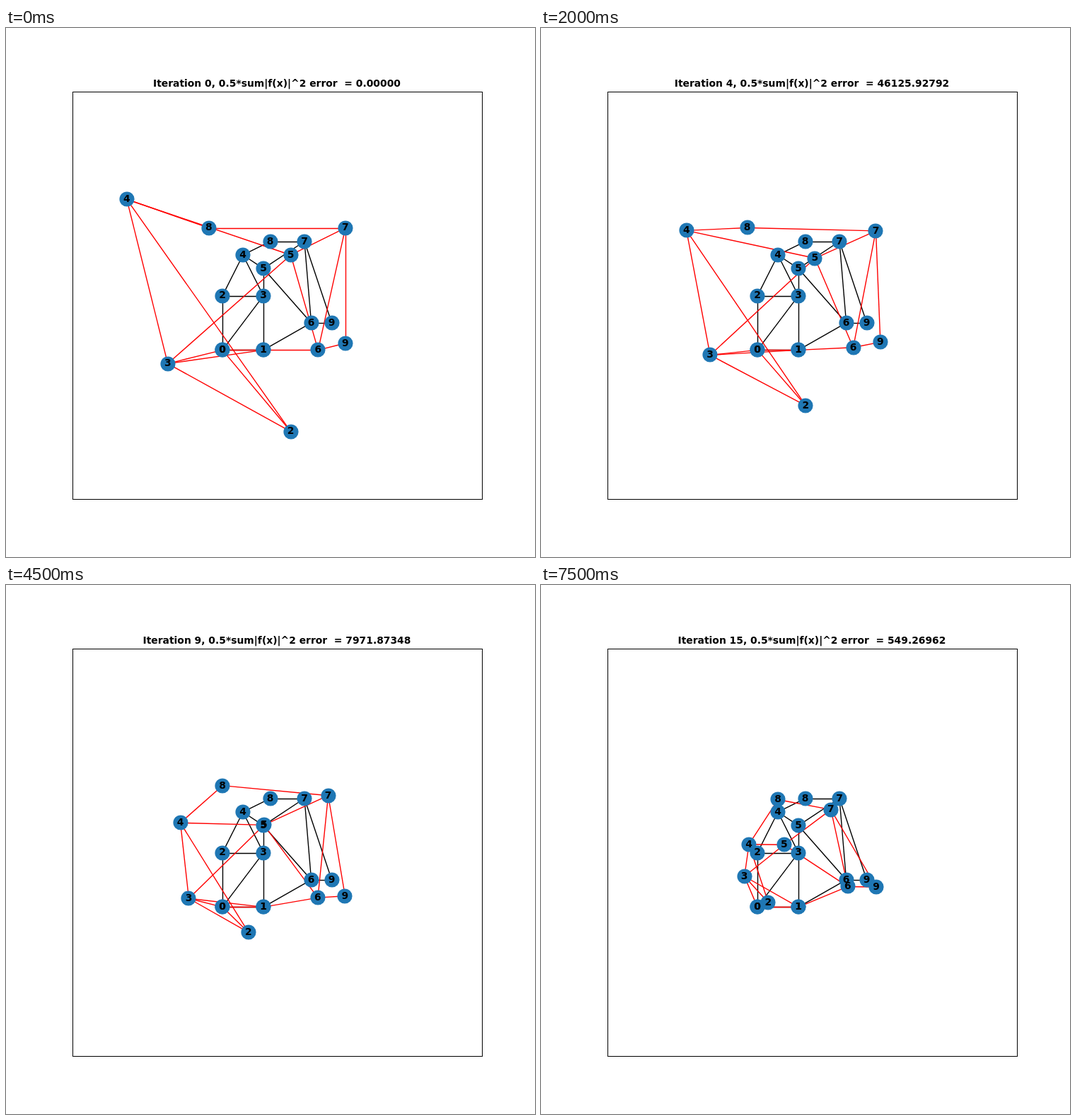
An HTML page for the animation above (8000 ms loop, 748 by 748 pixels).

```html
<!DOCTYPE html>
<html lang="en">
<head>
<meta charset="utf-8">
<title>Graph layout iterations</title>
<style>
  html, body { margin: 0; width: 100%; height: 100%; overflow: hidden; background: #fff; }
  svg { display: block; width: 748px; height: 748px; }
  line { stroke-width: 1.39; }
  circle { fill: #1f77b4; }
  text {
    font: bold 13.889px "DejaVu Sans", Verdana, sans-serif;
    text-anchor: middle;
    white-space: pre;
  }
</style>
</head>
<body>
<svg id="plot" viewBox="0 0 748 748">
  <g id="edges"></g>
  <g id="nodes"></g>
  <rect x="94.5" y="90.5" width="579" height="576" fill="none" stroke="#000"/>
  <g id="labels"></g>
  <text id="title" x="383" y="83"></text>
</svg>
<script>
const STEP_MS = 500, STEPS = 16, STEP_LENGTH = 1;
const ANCHORS = 2; // nodes 0 and 1 never move

// Node places in graph units, y up
const goal = [[0, 0], [3, 0], [0, 4], [3, 4], [1.5, 7],
  [3, 6], [6.5, 2], [6, 8], [3.5, 8], [8, 2]];
const guess = [[0, 0], [3, 0], [5, -6], [-4, -1], [-7, 11.1],
  [5, 7], [7, 0], [9, 9], [-1, 9], [9, 0.5]];

const pairs = ["01", "02", "03", "13", "23", "24", "34", "35", "45", "48",
  "57", "56", "16", "67", "69", "79", "78"].map(p => [+p[0], +p[1]]);

const diff = (pts, [a, b]) => [pts[a][0] - pts[b][0], pts[a][1] - pts[b][1]];
const squared = ([x, y]) => x * x + y * y;
const wanted = pairs.map(p => squared(diff(goal, p)));

// How far each squared edge length is from the wanted one
const residuals = pts => pairs.map((p, i) => squared(diff(pts, p)) - wanted[i]);
const errorOf = pts => residuals(pts).reduce((sum, f) => sum + f * f / 2, 0);

// One step of fixed length down the error's gradient
function descend(pts) {
  const grad = pts.map(() => [0, 0]);
  residuals(pts).forEach((f, i) => {
    const [a, b] = pairs[i];
    diff(pts, pairs[i]).forEach((d, axis) => {
      grad[a][axis] += 2 * f * d;
      grad[b][axis] -= 2 * f * d;
    });
  });
  const norm = Math.hypot(...grad.slice(ANCHORS).flat());
  return pts.map((p, i) => i < ANCHORS ? p
    : p.map((v, axis) => v - STEP_LENGTH * grad[i][axis] / norm));
}

const states = [guess];
while (states.length < STEPS) states.push(descend(states.at(-1)));

function set(el, attrs) {
  for (const name in attrs) el.setAttribute(name, attrs[name]);
}
function add(parent, tag, attrs = {}) {
  const el = document.createElementNS("http://www.w3.org/2000/svg", tag);
  set(el, attrs);
  return document.getElementById(parent).appendChild(el);
}

const toPx = ([x, y]) => [306.04 + x * 19.323, 455.37 - y * 19.199];

// Upright and level lines sit on pixel centres
const snap = v => Math.floor(v + 0.5) + 0.5;

function makeGraph(color) {
  const lines = pairs.map(() => add("edges", "line", { stroke: color }));
  const dots = goal.map(() => add("nodes", "circle", { r: 10.6 }));
  const labels = goal.map((_, i) => {
    const label = add("labels", "text");
    label.textContent = i;
    return label;
  });
  return state => {
    const pts = state.map(toPx);
    pairs.forEach(([a, b], i) => {
      let [x1, y1] = pts[a], [x2, y2] = pts[b];
      if (Math.abs(x1 - x2) < 1e-4 || Math.abs(y1 - y2) < 1e-4)
        [x1, y1, x2, y2] = [x1, y1, x2, y2].map(snap);
      set(lines[i], { x1, y1, x2, y2 });
    });
    pts.forEach(([x, y], i) => {
      set(dots[i], { cx: Math.round(x), cy: Math.round(y) });
      set(labels[i], { x, y: Math.round(y + 3.84) });
    });
  };
}

makeGraph("#000")(goal);
const drawMoving = makeGraph("#f00");
const title = document.getElementById("title");

function show(step) {
  drawMoving(states[step]);
  const error = step ? errorOf(states[step]) : 0;
  title.textContent = `Iteration ${step}, 0.5*sum|f(x)|^2 error  = ${error.toFixed(5)}`;
}

const start = performance.now();
let shown = -1;
function tick() {
  const step = Math.floor((performance.now() - start) / STEP_MS) % STEPS;
  if (step !== shown) show(shown = step);
  requestAnimationFrame(tick);
}
tick();
</script>
</body>
</html>
```
